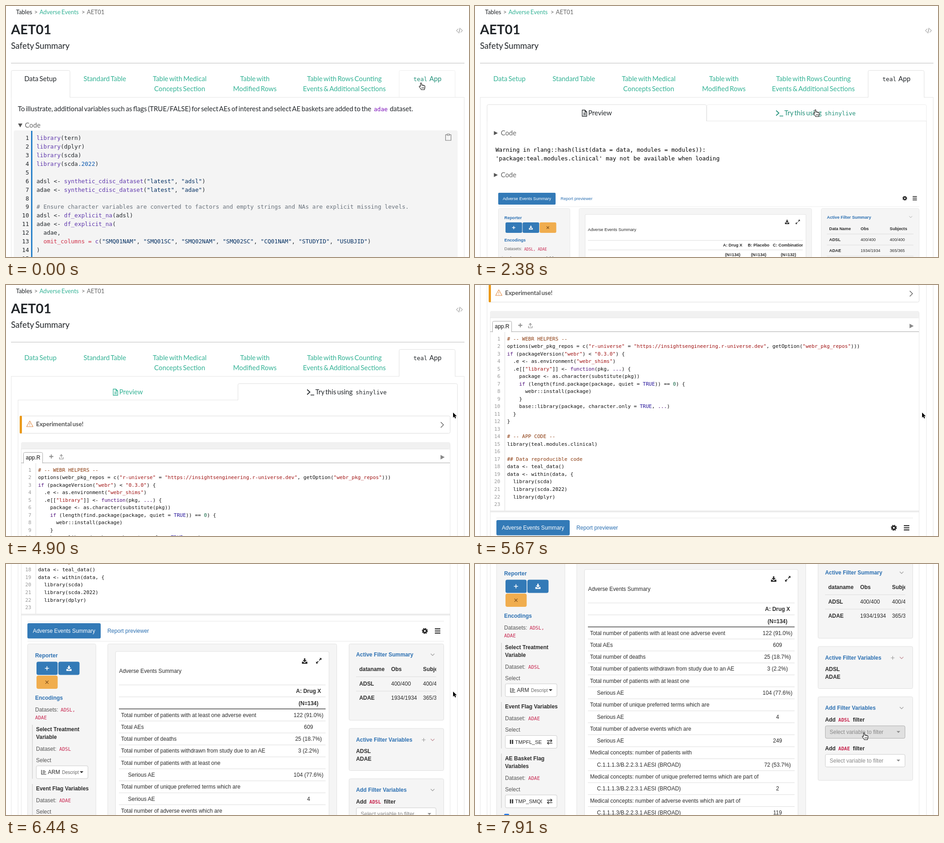
An HTML page for the animation above (8000 ms loop, 1017x551 px).

```html
<!DOCTYPE html>
<html lang="en">
<head>
<meta charset="utf-8">
<title>AET01</title>
<style>
html, body { margin: 0; width: 100%; height: 100%; overflow: hidden; background: #fff; }
#stage { display: block; width: 1017px; height: 551px; }
text { white-space: pre; }
.lato { font-family: Lato, sans-serif; word-spacing: -.1em; }
.mono { font-family: "DejaVu Sans Mono", monospace; }
.sans { font-family: "Liberation Sans", Arial, sans-serif; }
.b { font-weight: 700; }
</style>
</head>
<body>
<svg id="stage" viewBox="0 0 1017 551"></svg>
<script>
const INK = '#212529', TEAL = '#35b396', HOVER = '#23917a', BLUE = '#337ab7', LINK = '#2c70b2', RED = '#c7254e',
  GREY = '#666', EDGE = '#e6e6e6', PANEL = '#f5f5f5', AMBER = '#f0ad4e', DARK = '#2b2b2b';

// Drawing helpers
const esc = s => s.replace(/&/g, '&amp;').replace(/</g, '&lt;');
const raw = (x, y, body, cls, size, fill = INK, anchor = 'start') =>
  `<text x="${x}" y="${y}" class="${cls}" font-size="${size}" fill="${fill}" text-anchor="${anchor}">${body}</text>`;
const text = (x, y, s, ...rest) => raw(x, y, esc(s), ...rest);
const lato = (x, y, s, fill, anchor, size = 14.8) => text(x, y, s, 'lato', size, fill, anchor);
const sans = (x, y, s, fill = DARK, anchor, size = 12) => text(x, y, s, 'sans', size, fill, anchor);
const bold = (x, y, s, fill = DARK, anchor, size = 11.9) => text(x, y, s, 'sans b', size, fill, anchor);
const mono = (x, y, s, fill, size = 12.58) => text(x, y, s, 'mono', size, fill);
const box = (x, y, x2, y2, fill = '#fff', stroke = 'none', r = 0) =>
  `<rect x="${x}" y="${y}" width="${x2 - x}" height="${y2 - y}" fill="${fill}" stroke="${stroke}" rx="${r}"/>`;
const path = (d, stroke = 'none', w = 1, fill = 'none', more = '') =>
  `<path d="${d}" stroke="${stroke}" stroke-width="${w}" fill="${fill}" ${more}/>`;
const hline = (x, x2, y, c = '#ddd', w = 1) => path(`M${x} ${y}H${x2}`, c, w);
const vline = (x, y, y2, c = EDGE, w = 1) => path(`M${x} ${y}V${y2}`, c, w);
const at = (x, y, s, body) => `<g transform="translate(${x} ${y}) scale(${s})">${body}</g>`;
const clip = (x, y, w, h, body) =>
  `<svg x="${x}" y="${y}" width="${w}" height="${h}" viewBox="${x} ${y} ${w} ${h}">${body}</svg>`;
const group = (id, body) => `<g id="${id}">${body}</g>`;
const tabShape = (x, x2, y, y2, c = '#e0e0e0') =>
  path(`M${x} ${y2}V${y + 3}q0-3 3-3H${x2 - 3}q3 0 3 3V${y2}`, c, 1, '#fff');

function mark(line, rules) {
  const re = new RegExp(rules.map(r => `(${r[0]})`).join('|'), 'g');
  let out = '', end = 0;
  for (const m of line.matchAll(re)) {
    const k = m.slice(1).findIndex(Boolean);
    out += esc(line.slice(end, m.index)) + `<tspan fill="${rules[k][1]}">${esc(m[0])}</tspan>`;
    end = m.index + m[0].length;
  }
  return out + esc(line.slice(end));
}
const listing = (src, rules, x, numX, y, step, size, numFill, fill) => src.split('\n').map((s, i) =>
  text(numX, y + step * i, `${i + 1}`, 'mono', size, numFill, 'end') +
  raw(x, y + step * i, mark(s, rules), 'mono', size, fill)).join('');

// Icons
const gear = (x, y, s) => at(x, y, s, `<circle r="3.6" fill="none" stroke="${DARK}" stroke-width="3.2"/>
  <circle r="5.5" fill="none" stroke="${DARK}" stroke-width="2.2" stroke-dasharray="2.3 2.02"/>`);
const menu = (x, y, s) => at(x, y, s, path('M-5.5-4.2h11M-5.5 0h11M-5.5 4.2h11', DARK, 1.9));
const download = (x, y, s, c = DARK) => at(x, y, s,
  path('M-1.5-6h3v4h3L0 2.5-4.5-2h3zM-6 1.5h3L0 4.5 3 1.5h3V6H-6z', 'none', 0, c));
const expand = (x, y, s) => at(x, y, s,
  path('M1-1 5-5M-1 1-5 5', DARK, 1.8) + path('M1.5-6H6v4.5zM-6 1.5V6h4.5z', 'none', 0, DARK));
const chevron = (x, y, c = '#999', s = 1) => at(x, y, s, path('M-4-2 0 2 4-2', c, 1.1));
const plus = (x, y, c, r = 4, w = 1.4) => path(`M${x - r} ${y}h${2 * r}M${x} ${y - r}v${2 * r}`, c, w);
const cross = (x, y, r) => path(`M${x - r} ${y - r}l${2 * r} ${2 * r}m0 ${-2 * r}l${-2 * r} ${2 * r}`, '#7a4a16', 1.2);
const caret = (x, y, c = DARK) => path(`M${x - 4} ${y - 2}h8l-4 4z`, 'none', 0, c);
const pause = (x, y) => path(`M${x - 2} ${y - 4.5}v9m4.5-9v9`, DARK, 2.6);
const swap = (x, y) => path(`M${x - 6} ${y - 2.5}h11m-3-3 3 3-3 3M${x + 6} ${y + 2.8}h-11m3-3-3 3 3 3`, DARK, 1.3);
const fileIcon = c => path('M235.5 228.5h6l4 4v9.5h-10zM241.5 228.5v4h4M238 235.5h5.5M238 238.5h5.5', c, 1.3);
const prompt = c => path('M661.5 229.5l6 5.5-6 5.5M669 241.5h8', c, 1.7);

// Tabs
function outerTabs(active) {
  const fill = k => k === active ? INK : TEAL;
  const app = active ? INK : 'currentColor';
  return hline(11, 1007, 200.5, EDGE) +
    (active ? tabShape(863.5, 986.5, 141.5, 201) : tabShape(11.5, 140.5, 141.5, 201) + tabShape(863.5, 986.5, 141.5, 200, '#eee')) +
    lato(75.7, 165, 'Data Setup', fill(0), 'middle') +
    [[217, 'Standard Table'], [381.5, 'Table with Medical', 'Concepts Section'], [546.7, 'Table with', 'Modified Rows'],
      [743.2, 'Table with Rows Counting', 'Events & Additional Sections']]
      .map(([x, ...rows]) => rows.map((s, i) => lato(x, 165 + 22.2 * i, s, TEAL, 'middle')).join('')).join('') +
    `<g ${active ? '' : 'id="tealLabel"'}>` + mono(895, 165, 'teal', app) + lato(930, 165, 'App', app) + '</g>';
}
function innerTabs(live) {
  const a = live ? TEAL : INK, b = live ? INK : 'currentColor';
  return hline(26, 992, 252.5, EDGE) + vline(26.5, 252, 1700) + vline(991.5, 252, 1700) +
    (live ? tabShape(509.5, 991.5, 216.5, 253) : tabShape(26.5, 508.5, 216.5, 253) +
      group('tryBox', tabShape(509.5, 991.5, 216.5, 252, '#eee'))) +
    fileIcon(a) + lato(248.7, 240, 'Preview', a) +
    `<g ${live ? '' : 'id="tryLabel"'}>` + prompt(b) +
    lato(679.5, 240, 'Try this using', b) + mono(768, 240, 'shinylive', b) + '</g>';
}

const header = lato(22, 17.5, 'Tables', INK, 'start', 12.95) + lato(62, 17.5, '>', GREY, 'start', 12.95) +
  lato(73.5, 17.5, 'Adverse Events', TEAL, 'start', 12.95) + lato(166, 17.5, '>', GREY, 'start', 12.95) +
  lato(177.5, 17.5, 'AET01', GREY, 'start', 12.95) +
  text(11, 62, 'AET01', 'lato b', 29.2) + lato(11, 94, 'Safety Summary', INK, 'start', 18.4) +
  path('M993.5 50l-4 4 4 4M998.5 50l4 4-4 4M997.3 48l-2.6 12', '#777', 1) +
  hline(11, 1007, 125.5, '#cfcfcf', 1.4) + vline(11.5, 200, 1700) + vline(1006.5, 200, 1700);

// Data Setup pane
const setupCode = `library(tern)
library(dplyr)
library(scda)
library(scda.2022)

adsl <- synthetic_cdisc_dataset("latest", "adsl")
adae <- synthetic_cdisc_dataset("latest", "adae")

# Ensure character variables are converted to factors and empty strings and NAs are explicit missing levels.
adsl <- df_explicit_na(adsl)
adae <- df_explicit_na(
  adae,
  omit_columns = c("SMQ01NAM", "SMQ01SC", "SMQ02NAM", "SMQ02SC", "CQ01NAM", "STUDYID", "USUBJID")
)
`;
const setupRules = [['#.*', '#6a737d'], ['"[^"]*"', '#032f62'], ['omit_columns =', '#d0324a'],
  ['\\.2022', '#0a58b0'], ['[\\w.]+(?=\\()', '#6039ad']];
const setupPane =
  lato(26, 231, 'To illustrate, additional variables such as flags (TRUE/FALSE) for select AEs of interest and select AE baskets are added to the') +
  mono(808, 231, 'adae', '#7d12ba') + lato(843, 231, 'dataset.') +
  path('M26.5 258h9.5l-4.7 8.5z', 'none', 0, '#555') + lato(41.5, 266.5, 'Code', GREY) +
  box(17, 273, 992, 700, '#f4f4f4', 'none', 4) + box(55, 274, 58, 700, '#2780c9') +
  listing(setupCode, setupRules, 67, 50.5, 293.8, 18.96, 12.58, INK, '#24292e') +
  path('M969 282.5h-3.5v12.5h12v-12.5H974M969 281h5v3h-5z', '#777', 1.1);

// Preview pane
const small = (x, y, s, fill, anchor) => sans(x, y + 3.3, s, fill, anchor, 9.2);
const smallBold = (x, y, s, fill, anchor) => bold(x, y + 3.3, s, fill, anchor, 9.2);
const previewPane = [279, 371].map(y =>
    path(`M41.5 ${y - 4.5}v9l8.5-4.5z`, 'none', 0, '#555') + lato(56.7, y + 5, 'Code', GREY)).join('') +
  mono(45, 319.5, 'Warning in rlang::hash(list(data = data, modules = modules)):', '#000') +
  mono(45, 338.5, "'package:teal.modules.clinical' may not be available when loading", '#000') +
  box(51, 410, 177, 436, BLUE, 'none', 2) + small(114, 423, 'Adverse Events Summary', '#fff', 'middle') +
  small(188, 423, 'Report previewer', LINK) + gear(944, 422, .78) + menu(966, 422, .85) + hline(51, 976, 440.5, '#eee') +
  box(51.5, 444.5, 208.5, 600, PANEL, '#e8e8e8', 3) + box(228.5, 444.5, 739.5, 600, PANEL, '#e8e8e8', 3) +
  box(760.5, 444.5, 975.5, 600, PANEL, '#e8e8e8', 3) + box(242, 457.5, 727, 600, '#fff', '#e3e3e3', 2) +
  smallBold(64.5, 465, 'Reporter', LINK) +
  box(67, 475, 103.5, 498, BLUE, 'none', 3) + box(104.5, 475, 141, 498, BLUE, 'none', 3) +
  box(142, 475, 178.5, 498, AMBER, 'none', 3) + plus(85, 486.5, '#fff', 3.5) + download(122.7, 486.5, .7, '#fff') + cross(160, 486.5, 2.7) +
  smallBold(64.5, 513.5, 'Encodings', LINK) + small(64.5, 533, 'Datasets:', GREY) + mono(108, 536.5, 'ADSL, ADAE', RED, 8.3) +
  vline(60, 549, 560, '#ddd', 2) + smallBold(66, 554, 'Select Treatment Variable') +
  download(685.5, 474, .78) + expand(709, 474, .78) + small(248, 491, 'Adverse Events Summary') +
  hline(248, 720, 514.5) + hline(248, 720, 535.5) +
  clip(248, 515, 472, 40, [[566, 'A: Drug X', 134], [623, 'B: Placebo', 134], [688.5, 'C: Combination', 132]].map(([x, s, n]) =>
    smallBold(x, 525, s, DARK, 'middle') + smallBold(x, 545.5, `(N=${n})`, DARK, 'middle')).join('')) +
  smallBold(773, 463.5, 'Active Filter Summary', LINK) + chevron(957, 463, '#999', .8) +
  [['Data Name', 'Obs', 'Subjects'], ['ADSL', '400/400', '400/400'], ['ADAE', '1934/1934', '365/365']].map((row, i) =>
    row.map((s, k) => (i && k ? small : smallBold)([778, 847, 911][k], 488.5 + 24.3 * i, s)).join('') +
    hline(773, 963, 500.5 + 24.3 * i)).join('');

// Live pane: editor
const liveCode = `# -- WEBR HELPERS --
options(webr_pkg_repos = c("r-universe" = "https://insightsengineering.r-universe.dev", getOption("webr_pkg_repos")))
if (packageVersion("webr") < "0.3.0") {
  .e <- as.environment("webr_shims")
  .e[["library"]] <- function(pkg, ...) {
    package <- as.character(substitute(pkg))
    if (length(find.package(package, quiet = TRUE)) == 0) {
      webr::install(package)
    }
    base::library(package, character.only = TRUE, ...)
  }
}

# -- APP CODE --
library(teal.modules.clinical)

## Data reproducible code
data <- teal_data()
data <- within(data, {
  library(scda)
  library(scda.2022)
  library(dplyr)
`;
const liveRules = [['#.*', '#8b3a0e'], ['"[^"]*"', '#a11515'], ['\\b(?:if|function)\\b|\\.\\.\\.', '#4a0a78'],
  ['TRUE', '#221199'], ['\\b0\\b', '#116644']];
const editor =
  box(31, 287.5, 975.5, 325.5, '#fff', '#dcdcdc', 3) + box(30, 287, 35, 326, '#eb9a1c', 'none', 2) +
  path('M52.3 298.5l7 12.5h-14zM52.3 303v4M52.3 308.2v1.3', '#e08a45', 1.1, 'none', 'stroke-linejoin="round"') +
  text(66, 309.5, 'Experimental use!', 'lato b', 13.3, '#555') + path('M955 301l6 6-6 6', '#555', 1.3) +
  box(33.5, 345.5, 975.5, 1700, '#fff', EDGE, 4) + box(33, 345, 975, 360, '#f1f1f1', 'none', 4) + hline(33, 975, 360, '#e4e4e4') +
  hline(33, 975, 390.5, '#a9a9a9') + tabShape(38.5, 80.5, 367.5, 391.5, '#a9a9a9') + sans(59.5, 382.5, 'app.R', '#111', 'middle') +
  plus(99.5, 376.5, '#888', 4.5, 1.8) + path('M117.5 378v4h8v-4M121.5 379.5v-7m-3 2.8 3-3 3 3', '#888', 1.2) +
  path('M954.5 373v10l9-5z', 'none', 0, '#888') + vline(65.5, 391, 783, '#ddd') +
  listing(liveCode, liveRules, 70.5, 55.5, 409.6, 16.52, 11, '#999', '#111') +
  box(34, 783, 975, 787, '#ececec');

// Live pane: running app
const encoding = (y, y2, rows, set, button) => vline(58, y, y2, '#ddd', 2) +
  rows.map((s, i) => bold(66, y2 - 88 - 17 * (rows.length - 1 - i), s)).join('') +
  sans(66, y2 - 62, 'Dataset:', '#555') + mono(117, y2 - 62, set, RED, 10.7) + sans(66, y2 - 37, 'Select', '#555') +
  box(66.5, y2 - 28.5, 180, y2 - .5, '#fff', '#ccc', 3) + button(y2 - 14.5);
const armButton = y => path(`M78 ${y - 5}v9.5h10.5M80.5 ${y - 3.5}h5M80.5 ${y - .7}h7M80.5 ${y + 2}h5`, DARK, 1.2) +
  sans(92, y + 4.2, 'ARM') + sans(123, y + 4, 'Descript', GREY, 'start', 10) + caret(166, y);
const flagButton = label => y => pause(80, y) + swap(164, y) +
  clip(88, y - 11, 59.5, 22, sans(88, y + 4.2, label, DARK, 'start', 11.4));
const concept = 'C.1.1.1.3/B.2.2.3.1 AESI (BROAD)', part = 'Medical concepts: number of ';
const summary = [
  ['Total number of patients with at least one adverse event', '122 (91.0%)'], ['Total AEs', '609'],
  ['Total number of deaths', '25 (18.7%)'], ['Total number of patients withdrawn from study due to an AE', '3 (2.2%)'],
  ['Total number of patients with at least one'], ['Serious AE', '104 (77.6%)', 1],
  ['Total number of unique preferred terms which are'], ['Serious AE', '4', 1],
  ['Total number of adverse events which are'], ['Serious AE', '249', 1],
  [part + 'patients with'], [concept, '72 (53.7%)', 1],
  [part + 'unique preferred terms which are part of'], [concept, '2', 1],
  [part + 'adverse events which are part of'], [concept, '119', 1]];
const addFilter = (y, set, id) => bold(769, y, 'Add') + text(798, y, set, 'mono b', 10.7, RED) + bold(830, y, 'filter') +
  `<g id="${id}" fill="#fff" stroke="#ccc"><rect x="769.5" y="${y + 9.5}" width="175" height="27.5" rx="3"/></g>` +
  sans(779, y + 27.3, 'Select variable to filter', '#888') + caret(930, y + 23, '#888');
const app = hline(47, 962, 799.5, '#e8e8e8') + box(47, 804, 208, 837.5, BLUE, 'none', 3) +
  sans(127.5, 825, 'Adverse Events Summary', '#fff', 'middle', 11.85) + sans(222.7, 825, 'Report previewer', LINK) +
  gear(920, 821, 1) + menu(948, 821, 1.1) + hline(47, 962, 843.5, '#e8e8e8') +
  box(47.5, 849.5, 197.5, 1600, PANEL, '#e3e3e3', 3) + box(223.5, 849.5, 726.5, 1600, PANEL, '#e3e3e3', 3) +
  box(240.5, 866, 709.5, 1600, '#fff', '#e0e0e0', 3) +
  bold(64, 879, 'Reporter', LINK) + box(67, 888.5, 113.5, 917.5, BLUE, 'none', 4) + box(115, 888.5, 161.5, 917.5, BLUE, 'none', 4) +
  box(67, 919, 113.5, 948, AMBER, 'none', 4) + plus(90, 903, '#fff', 4.5, 1.6) + download(138.3, 903, .95, '#fff') + cross(90, 933.5, 3.3) +
  bold(64, 972, 'Encodings', LINK) + sans(64, 998, 'Datasets:', '#555') + mono(120, 998, 'ADSL,', RED, 10.7) + mono(64, 1015, 'ADAE', RED, 10.7) +
  encoding(1027, 1145.5, ['Select Treatment', 'Variable'], 'ADSL', armButton) +
  encoding(1157, 1259, ['Event Flag Variables'], 'ADAE', flagButton('TMPFL_SE')) +
  encoding(1270, 1389.5, ['AE Basket Flag', 'Variables'], 'ADAE', flagButton('TMP_SMQ01')) + box(64, 1402.5, 75, 1414, '#1a73e8', 'none', 2) +
  sans(248.5, 913, 'Adverse Events Summary', DARK, 'start', 11.85) + download(656, 887, 1) + expand(687, 886.5, 1) +
  hline(248, 702, 939.5) + hline(248, 702, 965.7) + hline(248, 702, 992.2, '#222', 1.3) +
  bold(664.5, 957, 'A: Drug X', DARK, 'middle') + bold(664.5, 983.7, '(N=134)', DARK, 'middle') +
  summary.map(([s, n = '', deep = 0], i) => {
    const y = 1009.6 + 26.28 * i;
    return sans(deep ? 268 : 252.7, y, s) + sans(664.5, y, n, DARK, 'middle') + hline(248, 702, y + 9);
  }).join('') +
  [[849.5, 1017], [1035, 1127.5], [1145.5, 1329]].map(([y, y2]) => box(753.5, y, 961.5, y2, PANEL, '#e0e0e0', 3)).join('') +
  bold(769, 877, 'Active Filter Summary', LINK) + chevron(937, 873) +
  clip(769, 890, 176, 100, [['dataname', 'Obs', 'Subjects'], ['ADSL', '400/400', '400/400'], ['ADAE', '1934/1934', '365/365']]
    .map((row, i) => row.map((s, k) => (i && k ? sans : bold)([776, 846, 916][k], 909 + 31.5 * i, s)).join('') +
      (i < 2 ? hline(769, 945, 921.5 + 31.5 * i) : '')).join('')) +
  bold(769, 1064, 'Active Filter Variables', LINK) + plus(917.5, 1060, '#999', 4, 1.1) + chevron(937, 1060, '#c08a92') +
  bold(769, 1089, 'ADSL') + bold(769, 1106, 'ADAE') +
  bold(769, 1174, 'Add Filter Variables', LINK) + chevron(937, 1170) +
  addFilter(1199.7, 'ADSL', 'adslBox') + addFilter(1262.5, 'ADAE', 'adaeBox');

const hand = path('M-1.6 7.5V1.2C-1.6-.6 1-.6 1 1.2V5.2C1.3 4 3.3 4.1 3.5 5.4 4 4.5 5.8 4.8 6 6 6.6 5.3 8.2 5.6 8.2 7V10.5C8.2 12 7 13 7 14.8H.2C-.2 12.8-3 10.5-4.2 8.4-4.8 7-3.2 6.2-2.3 7.2z',
  '#111', 1.1, '#fff') + path('M1.6 9v3.5m2.2-3.5v3.5m2.1-3.5v3.5', '#111', .8);
const arrow = path('M0 0V11.2L2.6 8.8 4.4 13 6.4 12.1 4.6 8.1H8z', '#fff', 1.6, '#000', 'paint-order="stroke"');

document.getElementById('stage').innerHTML = group('page', header +
  group('setupTabs', outerTabs(0)) + group('setupPane', setupPane) + group('appTabs', outerTabs(1)) +
  group('previewTabs', innerTabs(false)) + group('previewPane', previewPane) +
  group('liveTabs', innerTabs(true)) + group('livePane', editor + app)) +
  group('cursor', group('hand', hand) + group('arrow', arrow));

// Motion: [time, value, slope] keys joined by Hermite curves
const scrollKeys = [[5110, 0, .3], [5670, 288, .6], [6440, 674, .42], [6930, 825, .2], [7210, 854, 0]];
const xKeys = [[1890, 912, 0], [2380, 748, -.5], [2730, 594, 0], [4130, 594, 0], [4900, 982, 0], [7490, 982, 0], [7910, 855, 0]];
const yKeys = [[1890, 169, 0], [2380, 228, .03], [2730, 231, 0], [4130, 231, 0], [4900, 280, 0], [7490, 280, 0], [7910, 371, 0]];

function track(keys, t) {
  if (t <= keys[0][0]) return keys[0][1];
  const i = keys.findIndex(k => k[0] > t);
  if (i < 0) return keys[keys.length - 1][1];
  const [t0, a, m0] = keys[i - 1], [t1, b, m1] = keys[i], d = t1 - t0, u = (t - t0) / d, v = 1 - u;
  return v * v * (1 + 2 * u) * a + u * v * v * d * m0 + u * u * (3 - 2 * u) * b - u * u * v * d * m1;
}
const $ = id => document.getElementById(id);
const show = (id, opacity) => {
  $(id).style.display = opacity > 0 ? '' : 'none';
  $(id).style.opacity = Math.min(1, opacity);
};

const LOOP = 8000, TICK = 70, CLICK = 1190, OPEN_APP = 1400, OPEN_LIVE = 3500;
function draw(time) {
  const t = Math.floor(time / TICK) * TICK;
  const x = track(xKeys, t), y = track(yKeys, t), scroll = track(scrollKeys, t);
  const inApp = t >= OPEN_APP, inLive = t >= OPEN_LIVE;
  show('setupTabs', !inApp);
  show('setupPane', !inApp);
  show('appTabs', inApp);
  show('previewTabs', inApp && !inLive);
  show('previewPane', !inApp ? 0 : inLive ? .5 - (t - OPEN_LIVE) / 140 : .34 + (t - OPEN_APP) / 210);
  show('liveTabs', inLive);
  show('livePane', (t - 3570) / 280);

  const overTry = y > 216 && y < 253 && x > 509 && t < 5000;
  const overSelect = t > 7210 && x < 945 && y > 355;
  $('tealLabel').style.color = t < CLICK ? HOVER : INK;
  show('tryBox', overTry);
  $('tryLabel').style.color = overTry ? HOVER : TEAL;
  $('adslBox').setAttribute('fill', overSelect ? '#e0e0e0' : '#fff');
  $('adslBox').setAttribute('stroke', overSelect ? '#adadad' : '#ccc');

  const pointing = y < 200 || overTry || overSelect;
  show('hand', pointing);
  show('arrow', !pointing);
  $('page').setAttribute('transform', `translate(0 ${-Math.round(scroll)})`);
  $('cursor').setAttribute('transform', `translate(${x} ${y})`);
}

const start = performance.now();
function loop() {
  draw((performance.now() - start) % LOOP);
  requestAnimationFrame(loop);
}
loop();
</script>
</body>
</html>
```
